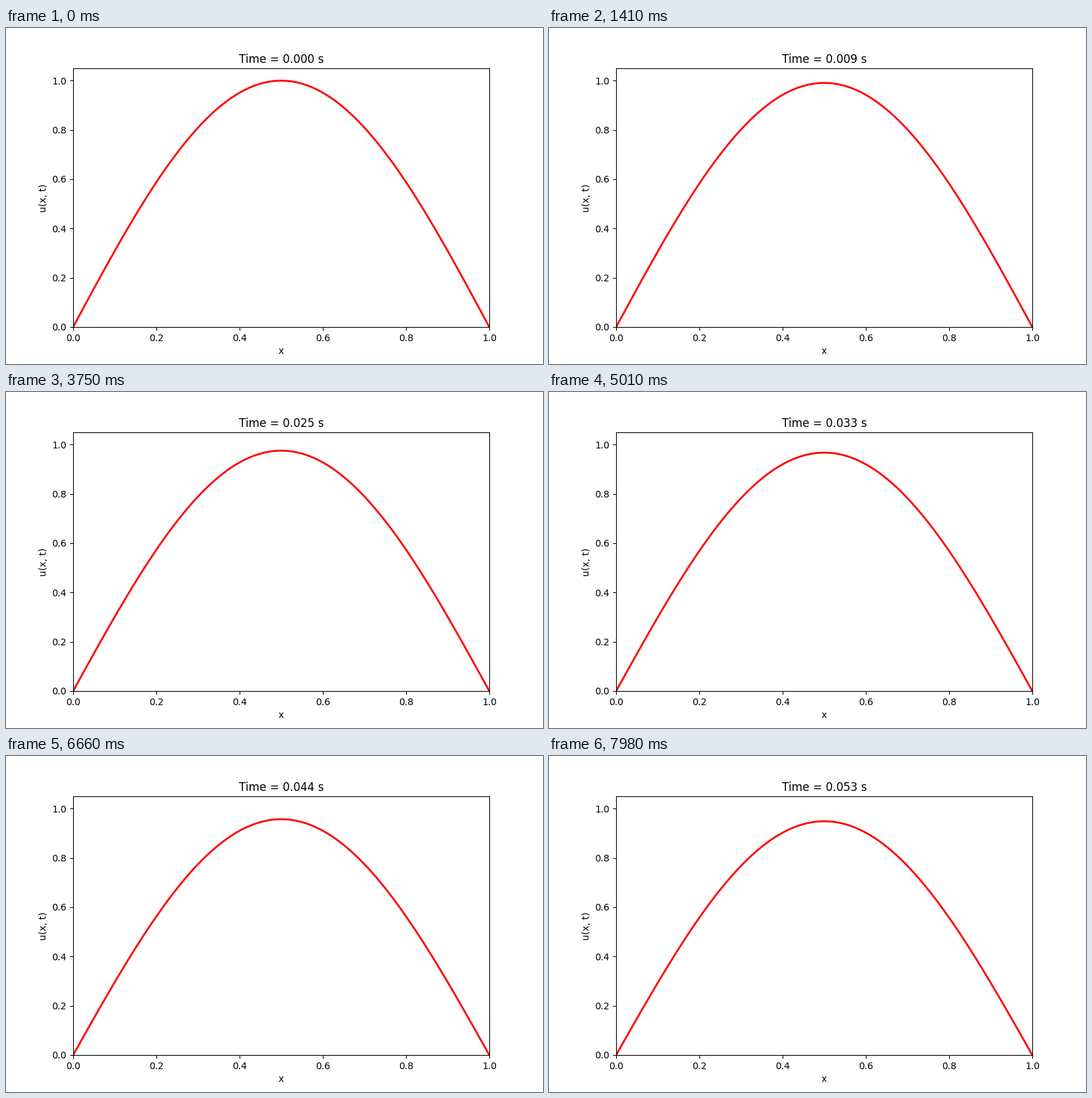
A matplotlib script for the animation above (8000 ms loop, 800 by 500 pixels).

```python
import numpy as np
import matplotlib.pyplot as plt
from matplotlib.animation import FuncAnimation

LOOP_MS = 8000
TICK_MS = 20      # animation timer
STEP_MS = 30      # display time of one solver step
DT = 0.0002       # simulated seconds per step
ALPHA = 0.1       # thermal diffusivity

x = np.linspace(0, 1, 101)
mode = np.sin(np.pi * x)

fig, ax = plt.subplots(figsize=(8, 5), dpi=100)
line, = ax.plot(x, mode, color="red", lw=2)
ax.set_xlim(0, 1)
ax.set_ylim(0, 1.05)
ax.set_xlabel("x")
ax.set_ylabel("u(x, t)")
title = ax.set_title("Time = 0.000 s")


def update(i):
    step = (i * TICK_MS + TICK_MS // 2) // STEP_MS
    t = step * DT
    line.set_ydata(mode * np.exp(-ALPHA * np.pi ** 2 * t))
    title.set_text(f"Time = {t:.3f} s")
    return line, title


anim = FuncAnimation(fig, update, frames=LOOP_MS // TICK_MS,
                     interval=TICK_MS, repeat=True, repeat_delay=0)
plt.show()
```
